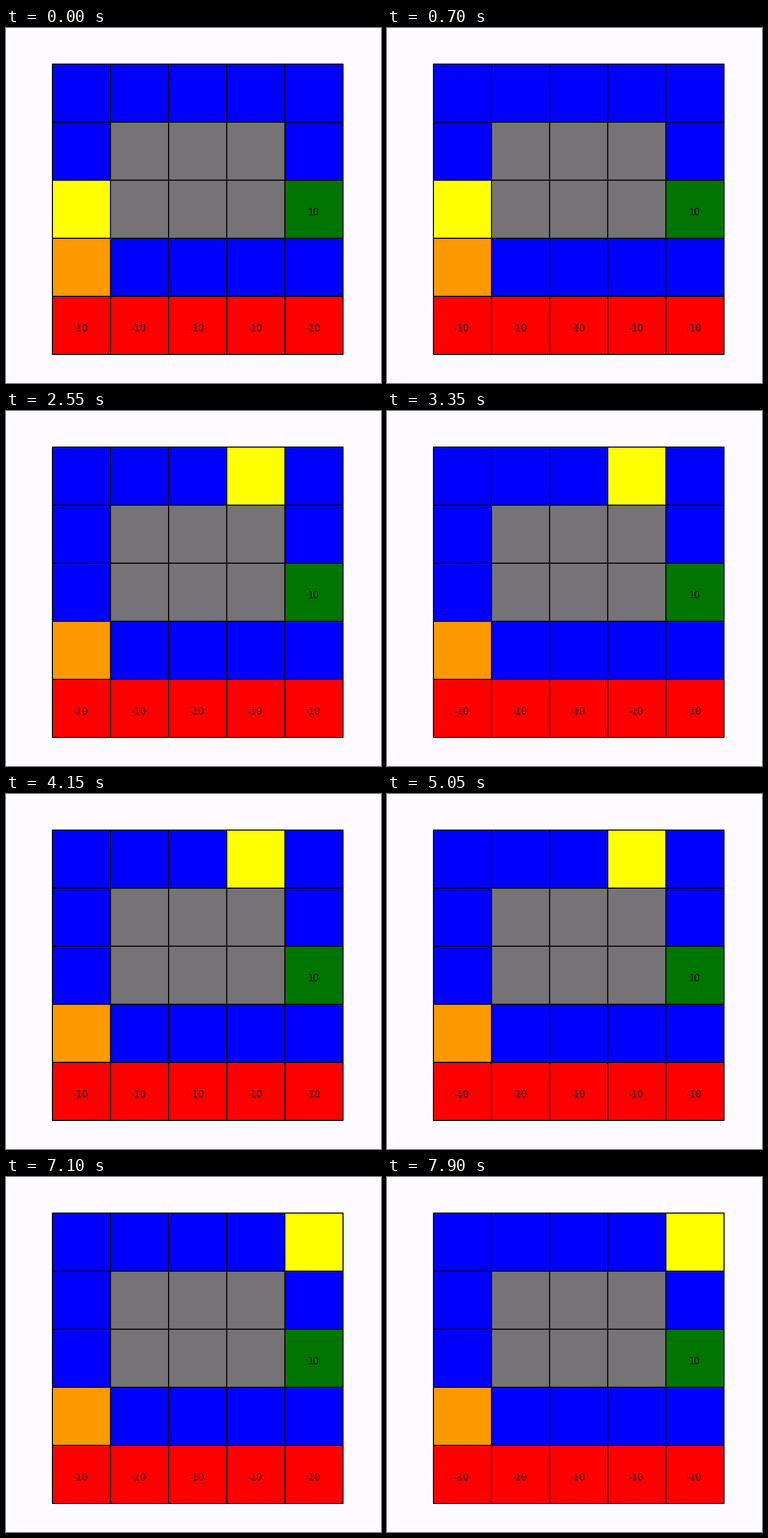
Animation of 400x379 px, one loop 8000 ms. Source, as a matplotlib script:

```python
import matplotlib.pyplot as plt
from matplotlib.animation import FuncAnimation
from matplotlib.patches import Rectangle

W, H, DPI = 400, 379, 100
LEFT, TOP, CELL = 49.5, 38.5, 62
INTERVAL, LOOP = 50, 8000

COLORS = {
    "B": "#0000ff",  # free
    "W": "#757375",  # wall
    "S": "#ff9900",  # start
    "G": "#007500",  # goal
    "R": "#ff0000",  # pit
}
AGENT = "#ffff00"
REWARDS = {"G": "10", "R": "-10"}
GRID = ["BBBBB", "BWWWB", "BWWWG", "SBBBB", "RRRRR"]

# (time in ms, column, row) of each move
PATH = [(0, 0, 2), (950, 0, 1), (1350, 0, 0), (1750, 1, 0), (2150, 2, 0)]
# then the agent wavers between the last two columns of the top row
WAVER = [2550, 2950, 3300, 3750, 4100, 4550, 4950, 5350, 5700, 6550, 7300, 7700]
PATH += [(t, 3 + i % 2, 0) for i, t in enumerate(WAVER)]

fig = plt.figure(figsize=(W / DPI, H / DPI), dpi=DPI, facecolor="#fdfbff")
ax = fig.add_axes([0, 0, 1, 1])
ax.set_xlim(0, W)
ax.set_ylim(H, 0)
ax.axis("off")

cells = {}
for row, line in enumerate(GRID):
    for col, kind in enumerate(line):
        x, y = LEFT + col * CELL, TOP + row * CELL
        # snapping would push the half-pixel edges one pixel off
        cells[col, row] = ax.add_patch(Rectangle(
            (x, y), CELL, CELL, facecolor=COLORS[kind],
            edgecolor="black", linewidth=0.8, snap=False))
        if kind in REWARDS:
            ax.text(x + CELL / 2 - 0.5, y + 37, REWARDS[kind], ha="center",
                    va="baseline", family="DejaVu Sans",
                    fontsize=10 * 72 / DPI, color="black", alpha=0.85)


def agent_cell(ms):
    return [(col, row) for t, col, row in PATH if t <= ms][-1]


def update(frame):
    here = agent_cell(frame * INTERVAL)
    for (col, row), cell in cells.items():
        cell.set_facecolor(AGENT if (col, row) == here else COLORS[GRID[row][col]])
    return list(cells.values())


anim = FuncAnimation(fig, update, frames=LOOP // INTERVAL, interval=INTERVAL,
                     repeat=True, repeat_delay=0, blit=False)
plt.show()
```
